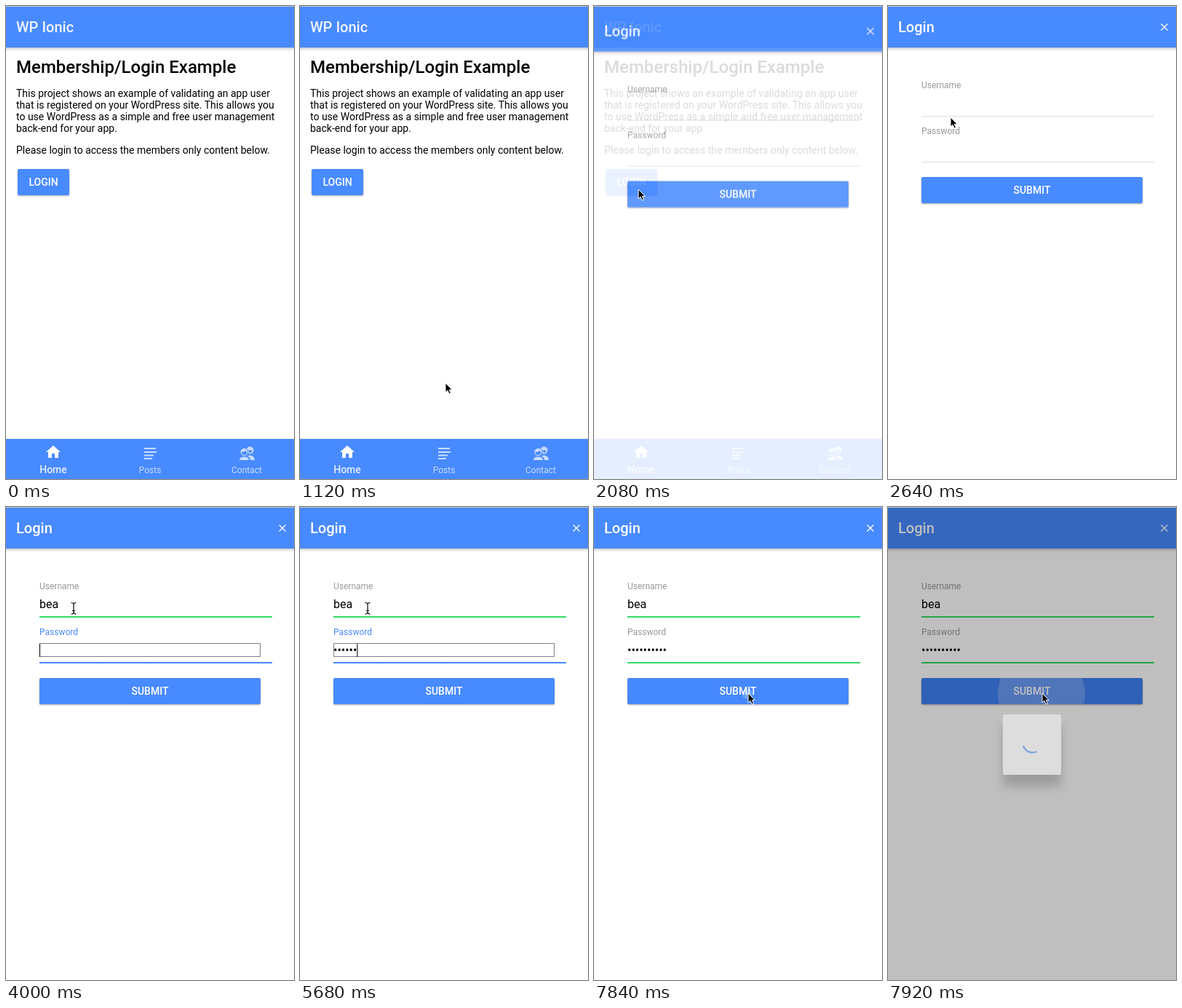
An HTML page for the animation above (8 s loop, 396 by 650 pixels).

```html
<!DOCTYPE html>
<html lang="en">
<head>
<meta charset="utf-8">
<title>Login demo</title>
<style>
  html, body { margin: 0; width: 100%; height: 100%; overflow: hidden; background: #fff; }
  svg { display: block; width: 100vw; height: 100vh; font: 14px Roboto, sans-serif; }
  text { white-space: pre; }
  .title { font-size: 20px; font-weight: 500; fill: #fff; }
  .heading { font-size: 24px; font-weight: 500; }
  .label { font-size: 12px; fill: #999; }
  .input { font-size: 16px; }
  .tab { font-size: 12px; fill: #fff; opacity: .7; text-anchor: middle; }
  .tab.on { font-size: 14px; font-weight: 500; opacity: .85; }
  .btn-text { font-weight: 500; fill: #fff; text-anchor: middle; }
  .blue { fill: #488aff; }
  .btn { filter: drop-shadow(0 1px 1px rgba(0, 0, 0, .35)); }
  .ripple { fill: #fff; fill-opacity: .22; r: 0; }
  .line { fill: #dedede; transform-box: fill-box; transform-origin: 0 100%; }
  .card { opacity: .47; }
  .card rect { filter: drop-shadow(0 16px 7px rgba(0, 0, 0, .4)); }

  /* 1% of the loop is 80 ms */
  .anim { animation: 8s step-end infinite; }
  #modal { animation-name: modal; }
  #userLabel { animation-name: userLabel; }
  #passLabel { animation-name: passLabel; }
  #userLine { animation-name: userLine; }
  #passLine { animation-name: passLine; }
  #userType { animation-name: userType; }
  #passType { animation-name: passType; }
  #userCaret { animation-name: userFocus; }
  #passCaret, #outline { animation-name: passFocus; }
  #loginRipple { animation-name: loginRipple; }
  #submitRipple { animation-name: submitRipple; }
  #submitFill { animation-name: pressed; }
  #loading { animation-name: loading; }
  #pointer { animation-name: move; }
  #arrow { animation-name: arrow; }
  #beam { animation-name: beam; }

  @keyframes modal {
    0% { opacity: 0; transform: translateY(40px); }
    25% { opacity: .16; transform: translateY(33.6px); }
    26% { opacity: .86; transform: translateY(5.6px); }
    27% { opacity: .977; transform: translateY(.9px); }
    28%, 100% { opacity: 1; transform: none; }
  }
  @keyframes userLabel { 0%, 50%, 100% { fill: #999; } 38% { fill: #488aff; } }
  @keyframes passLabel { 0%, 96%, 100% { fill: #999; } 50% { fill: #488aff; } }
  @keyframes userLine {
    0% { fill: #dedede; transform: scaleY(.5); }
    38% { fill: #488aff; transform: none; }
    50%, 100% { fill: #32db64; transform: none; }
  }
  @keyframes passLine {
    0% { fill: #dedede; transform: scaleY(.5); }
    50% { fill: #488aff; transform: none; }
    96%, 100% { fill: #32db64; transform: none; }
  }
  @keyframes userFocus { 0%, 50%, 100% { visibility: hidden; } 38% { visibility: visible; } }
  @keyframes passFocus { 0%, 96%, 100% { visibility: hidden; } 50% { visibility: visible; } }
  @keyframes userType {
    0% { transform: none; }
    45% { transform: translateX(17.6px); }
    47%, 100% { transform: translateX(26.6px); }
  }
  @keyframes passType {
    0% { transform: none; }
    56% { transform: translateX(5.4px); }
    59% { transform: translateX(10.8px); }
    62% { transform: translateX(16.2px); }
    65% { transform: translateX(21.6px); }
    68% { transform: translateX(27px); }
    71% { transform: translateX(32.3px); }
    75% { transform: translateX(37.7px); }
    78% { transform: translateX(43.1px); }
    81% { transform: translateX(48.5px); }
    84%, 100% { transform: translateX(53.9px); }
  }
  @keyframes loginRipple {
    0%, 28%, 100% { r: 0; }
    23% { r: 7px; }
    24% { r: 32px; }
    25% { r: 60px; }
  }
  @keyframes submitRipple { 0% { r: 0; } 98% { r: 7px; } 99%, 100% { r: 60px; } }
  @keyframes pressed { 0% { fill: #488aff; } 98% { fill: #4688fd; } 99%, 100% { fill: #4180f5; } }
  @keyframes loading { 0% { visibility: hidden; } 99%, 100% { visibility: visible; } }
  @keyframes move {
    0%, 3% { transform: translate(291px, 577px); animation-timing-function: steps(3); }
    6% { transform: translate(196px, 432px); animation-timing-function: steps(3); }
    9%, 11% { transform: translate(212px, 517px); animation-timing-function: steps(3); }
    14% { transform: translate(200px, 518px); animation-timing-function: steps(7); }
    21%, 22% { transform: translate(58px, 254px); animation-timing-function: steps(2); }
    24%, 27% { transform: translate(61px, 252px); animation-timing-function: steps(6); }
    33% { transform: translate(86px, 153px); animation-timing-function: steps(4); }
    37%, 87% { transform: translate(93px, 139px); animation-timing-function: steps(8); }
    95%, 100% { transform: translate(212px, 256px); }
  }
  @keyframes arrow {
    0%, 34% { visibility: hidden; }
    3%, 91%, 100% { visibility: visible; }
  }
  @keyframes beam { 0%, 91%, 100% { visibility: hidden; } 34% { visibility: visible; } }
</style>
</head>
<body>
<svg viewBox="0 0 396 650">
  <defs>
    <linearGradient id="shade" x2="0" y2="1">
      <stop stop-opacity=".24"/>
      <stop offset=".4" stop-opacity=".08"/>
      <stop offset="1" stop-opacity="0"/>
    </linearGradient>
    <clipPath id="loginClip"><rect x="16" y="224" width="71" height="36" rx="2"/></clipPath>
    <clipPath id="submitClip"><rect x="46" y="235" width="304" height="36" rx="2"/></clipPath>
    <g id="header">
      <rect y="57" width="396" height="6" fill="url(#shade)"/>
      <rect width="396" height="57" class="blue"/>
    </g>
  </defs>

  <g id="home">
    <use href="#header"/>
    <text class="title" x="14" y="36" opacity=".92">WP Ionic</text>
    <text class="heading" x="14" y="92">Membership/Login Example</text>
    <text x="14" y="125">This project shows an example of validating an app user</text>
    <text x="14" y="141">that is registered on your WordPress site. This allows you</text>
    <text x="14" y="157">to use WordPress as a simple and free user management</text>
    <text x="14" y="173">back-end for your app.</text>
    <text x="14" y="203">Please login to access the members only content below.</text>
    <rect class="blue btn" x="16" y="224" width="71" height="36" rx="2"/>
    <g clip-path="url(#loginClip)"><circle id="loginRipple" class="ripple anim" cx="61" cy="253"/></g>
    <text class="btn-text" x="51.5" y="247">LOGIN</text>

    <rect y="594" width="396" height="1" opacity=".08"/>
    <rect class="blue" y="595" width="396" height="55"/>
    <path fill="#fff" d="M63 621v-6h4v6h5v-8h3L65 604 55 613h3v8z"/>
    <path fill="none" stroke="#fff" stroke-width="2" opacity=".7" d="M190 608h16M190 613h17M190 617.500h13M190 622h11"/>
    <g fill="#fff" opacity=".7">
      <circle cx="335.500" cy="610.500" r="5"/>
      <path d="M335 617.500q7 .5 7 6.500h-6q0-4-4-5.500z"/>
      <circle cx="327.500" cy="613" r="5.500" stroke="#488aff"/>
      <path d="M321 624q0-4.500 6.500-4.500t6.500 4.500z"/>
      <path class="blue" d="M323.500 613q4 .5 5.500-2 1 2 2.500 2-.5 4-4 4t-4-4z"/>
      <path class="blue" d="M333 610.500h5.500q-.5 3.500-3 3.500z"/>
    </g>
    <text class="tab on" x="65" y="642">Home</text>
    <text class="tab" x="198" y="642">Posts</text>
    <text class="tab" x="331" y="642">Contact</text>
  </g>

  <g id="modal" class="anim">
    <rect width="396" height="650" fill="#fff"/>
    <use href="#header"/>
    <text class="title" x="14" y="36">Login</text>
    <path stroke="#fff" stroke-width="1.400" d="M375.500 24.500l9 9m0-9l-9 9"/>

    <text id="userLabel" class="label anim" x="46" y="113">Username</text>
    <text class="input" x="46" y="139">bea</text>
    <g id="userType" class="anim">
      <rect x="46" y="124" width="40" height="20" fill="#fff"/>
      <rect id="userCaret" class="anim" x="46" y="124" width="1" height="19"/>
    </g>
    <rect id="userLine" class="line anim" x="46" y="150" width="320" height="2"/>

    <text id="passLabel" class="label anim" x="46" y="176">Password</text>
    <text class="input" x="46" y="202">••••••••••</text>
    <g id="passType" class="anim">
      <rect x="46" y="189" width="62" height="16" fill="#fff"/>
      <rect id="passCaret" class="anim" x="46" y="188" width="1" height="18"/>
    </g>
    <rect id="outline" class="anim" x="46.500" y="187.500" width="303" height="18" fill="none" stroke="#000" stroke-dasharray="1"/>
    <rect id="passLine" class="line anim" x="46" y="213" width="320" height="2"/>

    <rect id="submitFill" class="blue btn anim" x="46" y="235" width="304" height="36" rx="2"/>
    <g clip-path="url(#submitClip)"><circle id="submitRipple" class="ripple anim" cx="211" cy="257"/></g>
    <text class="btn-text" x="198" y="258">SUBMIT</text>
  </g>

  <g id="loading" class="anim">
    <rect width="396" height="650" opacity=".25"/>
    <g class="card">
      <rect x="158" y="285" width="80" height="83" rx="2" fill="#fff"/>
      <path fill="none" stroke="#488aff" stroke-width="2.500" d="M186 328a13 13 0 0 0 18.500 8"/>
    </g>
  </g>

  <rect width="396" height="1" fill="#c8c8c8"/>

  <g id="pointer" class="anim">
    <path id="arrow" class="anim" stroke="#fff" stroke-width="1" d="M0 0V13l3-2.800 2.100 4.900 2.300-1-2.100-4.700H9.200z"/>
    <path id="beam" class="anim" fill="none" stroke="#000" stroke-width="1.200" d="M-3.500-7.500q3.500 0 3.500 2.500 0-2.500 3.500-2.500M0-5V6M-2 3.500H2M-3.500 8Q0 8 0 5.500 0 8 3.500 8"/>
  </g>
</svg>
</body>
</html>
```
